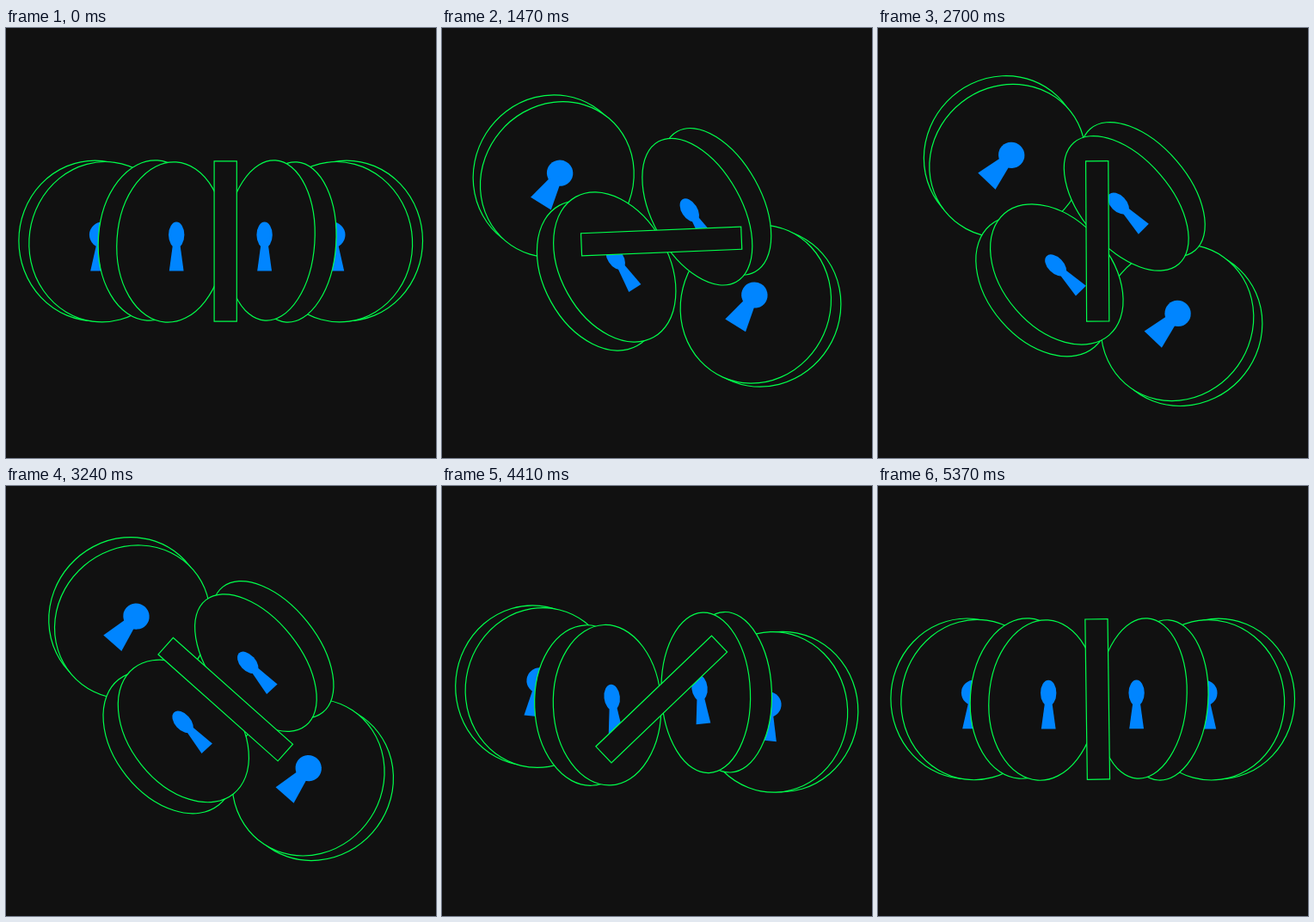
An HTML page that plays this animation: 500 px wide and 500 px high, repeating every 5.4 s.

```html
<!DOCTYPE html>
<html lang="en">
<head>
<meta charset="utf-8">
<title>Turning locks</title>
<style>
  html, body { margin: 0; width: 100%; height: 100%; overflow: hidden; background: #111; }
  svg { display: block; width: 100vw; height: 100vh; }
  ellipse, rect { fill: #111; stroke: #00ff4c; stroke-width: 1.2; }
  .hole * { fill: #0085ff; stroke: none; }
</style>
</head>
<body>
<svg viewBox="0 0 500 500">
  <g id="outer"></g>
  <g id="inner"></g>
  <g id="bar"><rect x="-13.1" y="-93.2" width="26.2" height="186.3"/></g>
</svg>
<script>
const LOOP = 5400, HALF = LOOP / 2, STEP = 30;
const $ = id => document.getElementById(id);

// All shapes are placed relative to the pivot of their group
const ring = (x, y, rx, tilt) =>
  `<ellipse rx="${rx}" ry="93.3" transform="translate(${x} ${y}) rotate(${tilt})"/>`;

const keyhole = (x, squeeze) =>
  `<g class="hole" transform="translate(${x} -7.4) scale(${squeeze} 1)">
    <ellipse rx="15.3" ry="15"/><path d="M-5.4 4H5.4L14 41.8H-14Z"/></g>`;

for (const side of [-1, 1]) {
  $('outer').innerHTML +=
    ring(side * 146.3, -.6, 88.5, 0) +
    ring(side * 136.3, .7, 86.5, -8 * side) +
    keyhole(side * 133.5 - 4, 1);

  const spread = side * (1 + .07 * side), rx = 57.2 - 5.5 * side;
  $('inner').innerHTML +=
    ring(81 * spread, side, rx, 3.8) +
    ring(57.8 * spread, -side, rx, 3.8) +
    keyhole(side * 51.2 + 4, .6);
}

function bezier(x1, y1, x2, y2) {
  const at = (a, b, s) => 3 * a * s * (1 - s) ** 2 + 3 * b * s * s * (1 - s) + s ** 3;
  return x => {
    let lo = 0, hi = 1;
    for (let i = 0; i < 30; i++) {
      const mid = (lo + hi) / 2;
      if (at(x1, x2, mid) < x) lo = mid; else hi = mid;
    }
    return at(y1, y2, (lo + hi) / 2);
  };
}

const swing = bezier(.8, .1, .15, .92);
const spinA = bezier(.278, 0, .674, 1);
const spinB = bezier(.266, 0, .666, 1);
const SPLIT = 2727, END = 5412;

const turn = (id, deg, x) =>
  $(id).setAttribute('transform', `translate(${x} 248) rotate(${deg})`);

function draw() {
  const t = Math.floor(performance.now() % LOOP / STEP) * STEP;
  const s = t <= HALF ? swing(t / HALF) : 1 - swing((t - HALF) / HALF);
  const spin = t < SPLIT ? spinA(t / SPLIT) : spinB((t - SPLIT) / (END - SPLIT));
  turn('outer', 43.6 * s, 249.7);
  turn('inner', -44.6 * s, 245.4);
  turn('bar', 1080 * spin, 255.2);
  requestAnimationFrame(draw);
}
draw();
</script>
</body>
</html>
```
